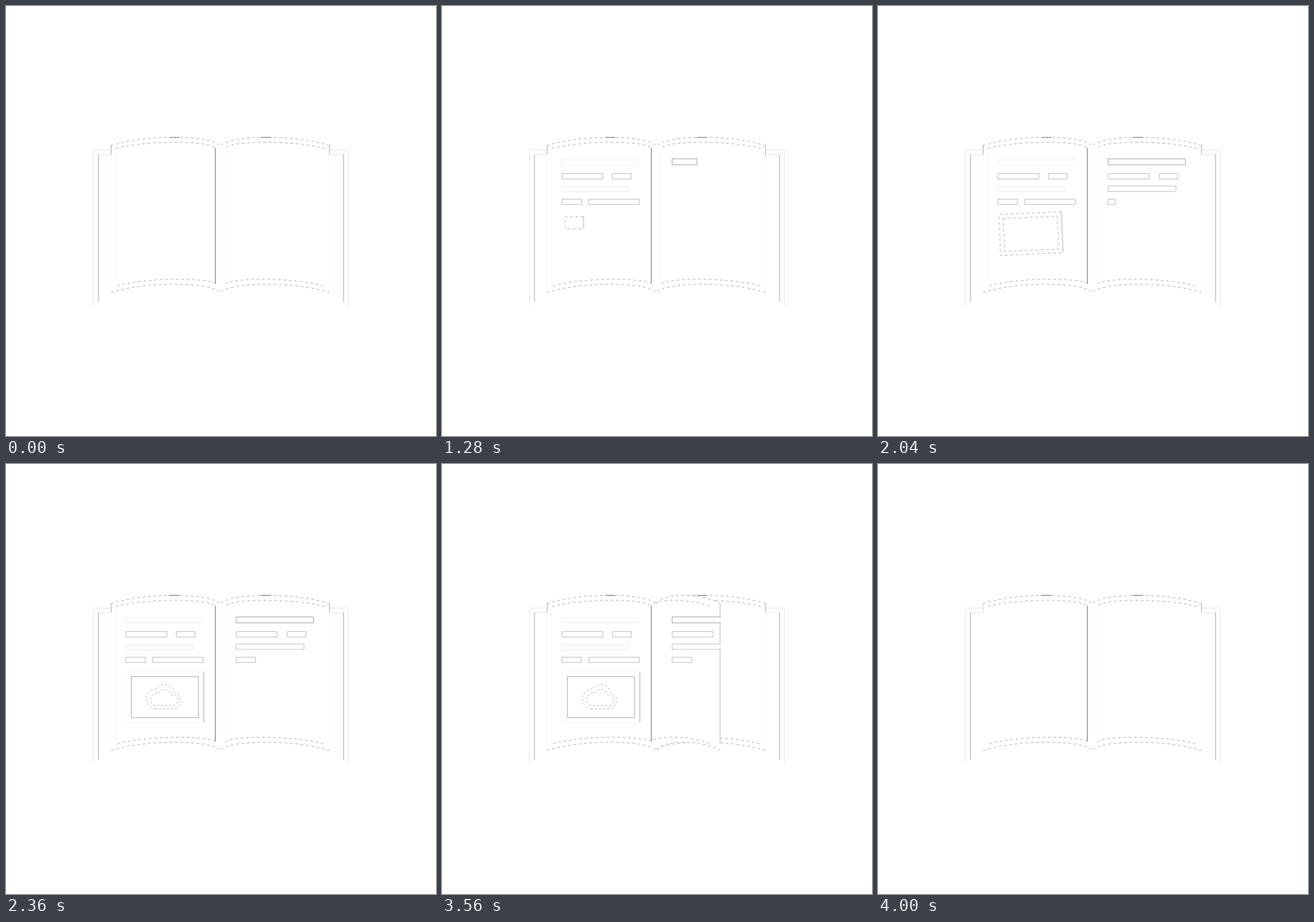
Recreate the animation shown at these times as an HTML page without scripts. Size 640 by 640 pixels, loop 4800 ms.

```html
<!DOCTYPE html>
<html lang="en">
<head>
<meta charset="utf-8">
<title>Open book</title>
<style>
html, body { margin: 0; width: 100%; height: 100%; overflow: hidden; background: #fff; }
svg { display: block; width: 100%; height: 100%; }
svg * { vector-effect: non-scaling-stroke; }
.line { fill: none; stroke: #888; stroke-width: .65; }
.faint { stroke: #f8f8f8; }
.soft { stroke: #ddd; }
.dark { stroke: #777; stroke-width: 1; }
.dashed { stroke-dasharray: 4 4; }
.paper { fill: #fff; }

svg [class] { animation: 4.8s linear infinite; }

/* Text bars, written one after another */
.bars rect { height: 8px; stroke: #999; stroke-width: .6; }
.bars .a1 { stroke: #e8e8e8; animation-name: a1; }
.bars .a2 { animation-name: a2; }
.bars .a3 { animation-name: a3; }
.bars .a4 { stroke: #e0e0e0; animation-name: a4; }
.bars .a5 { animation-name: a5; }
.bars .a6 { animation-name: a6; }
.bars .b1 { height: 9px; stroke: #777; animation-name: b1; }
.bars .b2 { animation-name: b2; }
.bars .b3 { animation-name: b3; }
.bars .b4 { animation-name: b4; }
.bars .b5 { animation-name: b5; }
@keyframes a1 { 0%, .4% { width: 0 } 7.1%, to { width: 115px } }
@keyframes a2 { 0%, 7.1% { width: 0 } 10.6%, to { width: 61px } }
@keyframes a3 { 0%, 10.6% { width: 0 } 12.3%, to { width: 28px } }
@keyframes a4 { 0%, 12.3% { width: 0 } 18.1%, to { width: 99px } }
@keyframes a5 { 0%, 18.1% { width: 0 } 19.75%, to { width: 29px } }
@keyframes a6 { 0%, 19.75% { width: 0 } 24.1%, to { width: 75px } }
@keyframes b1 { 0%, 24.6% { width: 0 } 31.1%, to { width: 115px } }
@keyframes b2 { 0%, 31.1% { width: 0 } 34.6%, to { width: 61px } }
@keyframes b3 { 0%, 34.6% { width: 0 } 36.2%, to { width: 28px } }
@keyframes b4 { 0%, 36.2% { width: 0 } 41.9%, to { width: 101px } }
@keyframes b5 { 0%, 41.9% { width: 0 } 43.6%, to { width: 29px } }

/* Content turns solid while the sheet sweeps over it */
svg .ink { fill: #fff; animation-name: ink; animation-timing-function: step-end; }
@keyframes ink { 0% { fill: #fff } 75.8% { fill: #b9b9b9 } }

svg .picture { transform-origin: 184.8px 315.5px; animation-name: bounce; }
@keyframes bounce {
  0%, 24.8% { transform: rotate(-2deg) scale(0) }
  34% { transform: rotate(4.5deg) scale(1.15); animation-timing-function: ease-in-out }
  42% { transform: rotate(-2.6deg) scale(.8); animation-timing-function: ease-in-out }
  46.6%, to { transform: none }
}
/* Frame outlines are broken while tilted, straight at rest */
svg .frame { animation-name: frame; animation-timing-function: step-end; }
svg .opening { animation-name: opening; animation-timing-function: step-end; }
@keyframes frame {
  0% { stroke: #888; stroke-dasharray: 4 4 }
  46.6% { stroke: #f4f4f4; stroke-dasharray: none }
}
@keyframes opening {
  0% { opacity: 0; stroke-dasharray: 4 4 }
  29% { opacity: 1; stroke-dasharray: 4 4 }
  46.6% { opacity: 1; stroke-dasharray: none }
}
svg .cloud { animation-name: rise; }
@keyframes rise {
  0%, 45% { transform: translateY(49px); animation-timing-function: ease-out }
  49.2%, to { transform: none }
}

/* Page turn: the sheet flips while the old spread is wiped at its edge */
svg .wipe { transform-origin: 155.5px 0; animation-name: wipe; }
@keyframes wipe {
  0%, 70% { transform: none; animation-timing-function: ease-in-out }
  83.3%, to { transform: scaleX(0) }
}
svg .flip { transform-origin: 319px 0; animation-name: flip; }
svg .flip.inner { transform-origin: 311.5px 0; }
@keyframes flip {
  0%, 70% { transform: scaleX(-1); animation-timing-function: ease-in-out }
  83.3%, to { transform: none }
}
svg .sheet { animation-name: sheet; animation-timing-function: step-end; }
svg .rim { animation-name: rim; animation-timing-function: step-end; }
svg .trace { animation-name: trace; animation-timing-function: step-end; }
@keyframes sheet { 0% { visibility: hidden } 71.4% { visibility: visible } }
@keyframes rim { 0% { opacity: 0 } 71.4% { opacity: 1 } 82.9% { opacity: 0 } }
@keyframes trace { 0% { opacity: 0 } 75.8% { opacity: 1 } 79.1% { opacity: 0 } }
</style>
</head>
<body>
<svg viewBox="0 0 640 640">
  <defs>
    <path id="outer" d="M156.5 208C205 191 306 191 319.5 209M156.5 426.5C205 410 306 410 319.5 426.5"/>
    <path id="inner" d="M163.5 212C208 200 300 200 311.5 211M165.5 416.5C208 404 300 404 311.5 413.5"/>
    <path id="crest" d="M243 195.5H258"/>
    <clipPath id="spread"><rect class="wipe" x="155.5" y="150" width="326.5" height="300"/></clipPath>
    <clipPath id="window"><rect x="186" y="317" width="101" height="60"/></clipPath>
  </defs>

  <g class="line">
    <path class="faint" d="M163.5 212V416M475.5 212V416M325.5 212V414M156.5 221V427M481.5 221V427"/>
    <path class="soft" d="M130.5 214.5H156.5M137.5 221.5H156.5M509.5 214.5H481.5M502.5 221.5H481.5M130.5 214V447.5M509.5 214V447.5"/>
    <path d="M137.5 221V440M156.5 207V221M502.5 221V440M481.5 207V221"/>
    <g class="dashed" transform="matrix(-1 0 0 1 638 0)">
      <use href="#outer"/><use href="#inner"/>
    </g>
    <g class="dashed" clip-path="url(#spread)">
      <use href="#outer"/><use href="#inner"/>
    </g>
  </g>

  <g class="sheet">
    <g class="flip">
      <path class="paper" d="M156.5 208C205 191 306 191 319.5 209V426.5C306 410 205 410 156.5 426.5Z"/>
      <use class="line dashed" href="#outer"/>
      <path class="line rim" d="M157.5 208V416"/>
    </g>
    <g class="flip inner"><use class="line dashed" href="#inner"/></g>
  </g>
  <g class="line dark">
    <path d="M311.5 211V413"/>
    <use href="#crest"/>
    <use href="#crest" x="136.5"/>
  </g>

  <g clip-path="url(#spread)">
    <g class="ink">
      <g class="bars">
        <rect class="a1" x="178.5" y="228.5"/>
        <rect class="a2" x="178.5" y="249.5"/>
        <rect class="a3" x="253.5" y="249.5"/>
        <rect class="a4" x="178.5" y="268.5"/>
        <rect class="a5" x="178.5" y="287.5"/>
        <rect class="a6" x="218.5" y="287.5"/>
        <rect class="b1" x="342.5" y="227.5"/>
        <rect class="b2" x="342.5" y="249.5"/>
        <rect class="b3" x="418.5" y="249.5"/>
        <rect class="b4" x="342.5" y="268"/>
        <rect class="b5" x="342.5" y="287.5"/>
      </g>
      <g class="picture">
        <path fill-rule="evenodd" d="M179 309H294.5V384.5H179ZM186.5 316.5V377.5H287V316.5Z"/>
        <path class="line frame" d="M294.5 309H179V384.5H294.5"/>
        <path class="line" d="M294.5 309V384.5"/>
        <path class="line opening" d="M186.5 316.5H286.5V377.5H186.5Z"/>
      </g>
      <g clip-path="url(#window)">
        <path class="cloud" fill-rule="evenodd" stroke="#999" stroke-width=".7" stroke-dasharray="3 3" d="M222 364.5A14.8 14.8 0 0 1 224 335A15 15 0 0 1 251 340A12.5 12.5 0 0 1 249 364.5ZM222 359.5A9.3 9.3 0 0 1 227 341.5A10 10 0 0 1 246 343.5A8 8 0 0 1 250 359.5Z"/>
      </g>
    </g>
  </g>
  <path class="line trace" d="M254 249.5H281.5V257.5H254"/>
</svg>
</body>
</html>
```
